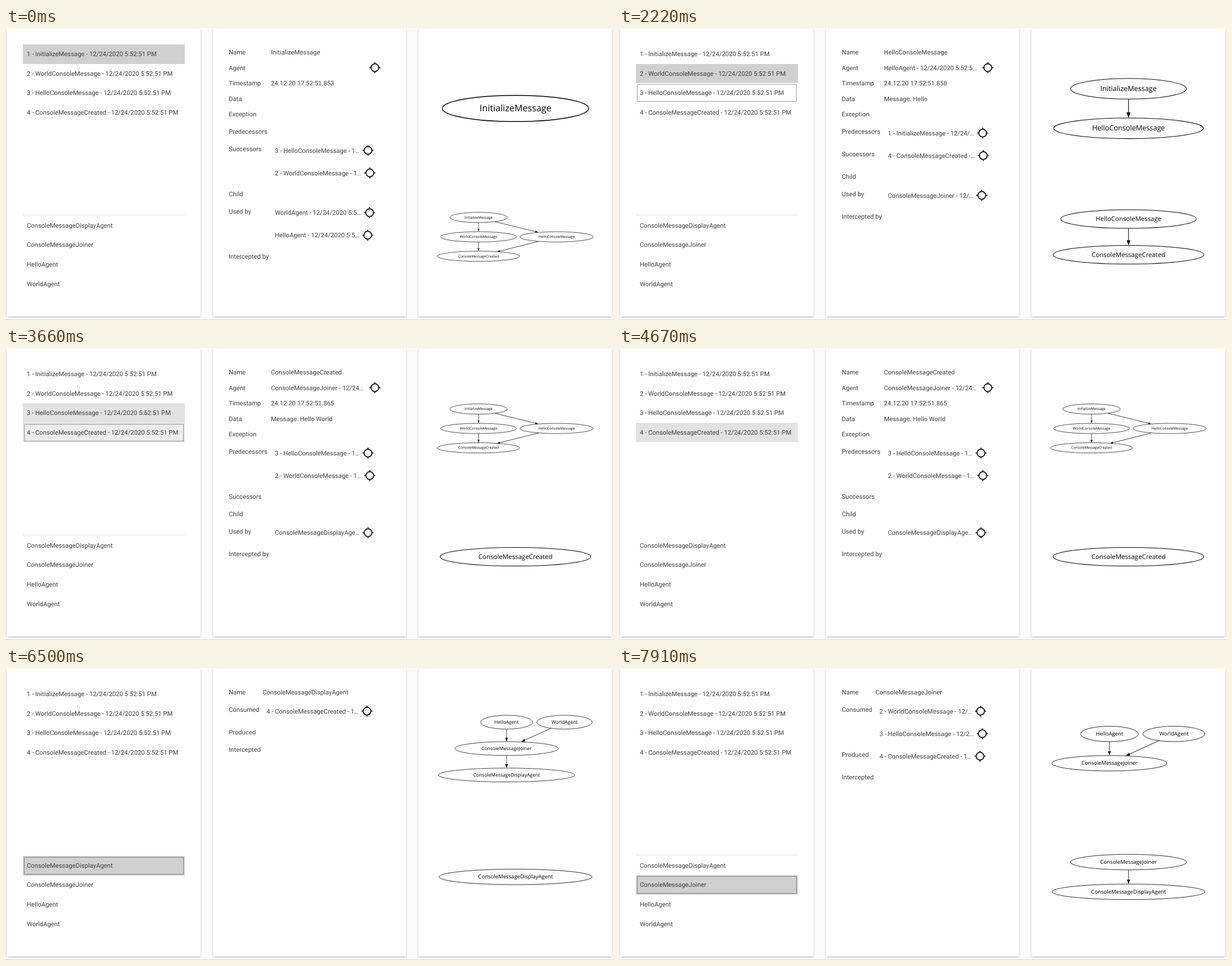
Animation, 1079 px wide and 519 px high, one loop 8000 ms. Source, as an HTML page with a canvas:

```html
<!DOCTYPE html>
<html lang="en">
<head>
<meta charset="utf-8">
<title>Message inspector</title>
<style>
  html, body { margin: 0; width: 100%; height: 100%; overflow: hidden; background: #fafafa; }
  canvas { display: block; }
</style>
</head>
<body>
<canvas id="stage" width="1079" height="519"></canvas>
<script>
const ctx = document.getElementById('stage').getContext('2d');
const LOOP = 8000;
const UI_FONT = '11.28px Roboto, sans-serif';
const MID = 905.7;
const STAMP = ' - 12/24/2020 5:52:51 PM';

// Each item: label, top of its row, and [time, grey] steps of its background.
const items = [
  { text: '1 - InitializeMessage' + STAMP, y: 29,
    fill: [[0, 208], [1220, 226], [1420, 250], [1620, 255]] },
  { text: '2 - WorldConsoleMessage' + STAMP, y: 64,
    fill: [[1220, 236], [1420, 218], [1620, 208], [2440, 230], [2640, 246], [2840, 255]] },
  { text: '3 - HelloConsoleMessage' + STAMP, y: 98,
    fill: [[2440, 232], [2640, 218], [2840, 208], [3660, 226], [3860, 243], [4060, 255]] },
  { text: '4 - ConsoleMessageCreated' + STAMP, y: 133,
    fill: [[3660, 236], [3860, 220], [4060, 208], [4670, 226], [4870, 236],
           [5070, 243], [5270, 246], [6100, 252], [6280, 255]] },
  { text: 'ConsoleMessageDisplayAgent', y: 334,
    fill: [[5880, 242], [6100, 230], [6280, 218], [6500, 208],
           [7310, 220], [7510, 232], [7710, 245], [7910, 255]] },
  { text: 'ConsoleMessageJoiner', y: 368,
    fill: [[7310, 242], [7510, 230], [7710, 212], [7910, 208]] },
  { text: 'HelloAgent', y: 403, fill: [] },
  { text: 'WorldAgent', y: 438, fill: [] }
];
const focus = [[0, -1], [1220, 1], [2220, 2], [3660, 3], [4670, -1], [5270, 4], [7310, 5]];

const node = (text, x, y, rx) => ({ text, x, y, rx });
const chain = (ry, a, b) => ({ ry, nodes: [a, b], down: [[0, 1]] });
const single = (ry, a) => ({ ry, nodes: [a] });

// The diamond of all four messages, placed by the y of its first row.
const fullGraph = y => ({
  ry: 9.1,
  nodes: [
    node('InitializeMessage', 840, y, 51),
    node('WorldConsoleMessage', 840, y + 34.5, 67.5),
    node('HelloConsoleMessage', 978.8, y + 34.5, 65.2),
    node('ConsoleMessageCreated', 840, y + 69, 73)
  ],
  down: [[0, 1], [1, 3]],
  slant: [[869, y + 7.5, 946, y + 26.4], [946.5, y + 42.6, 873, y + 61]]
});

const message = (name, agent, stamp, data, before, after, users, graphs) => ({
  valueX: 471, rowX: 478, graphs,
  fields: [['Name', name], ['Agent', agent], ['Timestamp', '24.12.20 17:52:51.' + stamp],
           ['Data', data], ['Exception', '']],
  listY: 184,
  lists: [['Predecessors', before], ['Successors', after], ['Child', []],
          ['Used by', users], ['Intercepted by', []]]
});
const agent = (name, consumed, produced, graphs) => ({
  valueX: 456, rowX: 463, graphs,
  fields: [['Name', name]],
  listY: 74,
  lists: [['Consumed', consumed], ['Produced', produced], ['Intercepted', []]]
});

const first = ['1 - InitializeMessage - 12/24/…'];
const last = ['4 - ConsoleMessageCreated -…'];
const pair = ['3 - HelloConsoleMessage - 1…', '2 - WorldConsoleMessage - 1…'];
const joiner = ['ConsoleMessageJoiner - 12/…'];
const created = y => node('ConsoleMessageCreated', MID, y, 134);
const display = y => node('ConsoleMessageDisplayAgent', MID, y, 136);

const views = [
  [0, message('InitializeMessage', '', '853', '', [], pair,
    ['WorldAgent - 12/24/2020 5:5…', 'HelloAgent - 12/24/2020 5:5…'],
    [single(23.3, node('InitializeMessage', MID, 143, 130)), fullGraph(336.7)])],
  [1220, message('WorldConsoleMessage', 'WorldAgent - 12/24/2020 5:52:…', '858',
    'Message: World', first, last, joiner,
    [chain(17.7, node('InitializeMessage', MID, 109.5, 100),
                 node('WorldConsoleMessage', MID, 177, 133.5)),
     chain(16.5, node('WorldConsoleMessage', MID, 339.5, 124.5), created(403))])],
  [2220, message('HelloConsoleMessage', 'HelloAgent - 12/24/2020 5:52:5…', '858',
    'Message: Hello', first, last, joiner,
    [chain(18.3, node('InitializeMessage', MID, 108, 103),
                 node('HelloConsoleMessage', MID, 178.3, 133)),
     chain(16.5, node('HelloConsoleMessage', MID, 339.5, 120.5), created(403))])],
  [3660, message('ConsoleMessageCreated', 'ConsoleMessageJoiner - 12/24…', '865',
    'Message: Hello World', pair, [], ['ConsoleMessageDisplayAge…'],
    [fullGraph(108.5), single(16.6, created(371))])],
  [5880, agent('ConsoleMessageDisplayAgent', ['4 - ConsoleMessageCreated - 1…'], [],
    [{ ry: 12.3,
       nodes: [node('HelloAgent', 889.8, 96.3, 46.3), node('WorldAgent', 992.8, 96.3, 49.3),
               node('ConsoleMessageJoiner', 889.8, 143.2, 92),
               node('ConsoleMessageDisplayAgent', 889.8, 190.2, 121)],
       down: [[0, 2], [2, 3]], slant: [[969, 107, 916, 131]] },
     single(13.8, display(371.3))])],
  [7310, agent('ConsoleMessageJoiner',
    ['2 - WorldConsoleMessage - 12/…', '3 - HelloConsoleMessage - 12/2…'],
    ['4 - ConsoleMessageCreated - 1…'],
    [{ ry: 13.7,
       nodes: [node('HelloAgent', 871.8, 117.2, 51.3), node('WorldAgent', 986.5, 117.2, 55),
               node('ConsoleMessageJoiner', 871.8, 169.3, 102.3)],
       down: [[0, 2]], slant: [[960, 129, 901, 156]] },
     chain(13.8, node('ConsoleMessageJoiner', MID, 345, 103.2), display(397.8))])]
];

// Latest value of a [time, value] list at time t.
function at(steps, t, value) {
  for (const [start, v] of steps) if (t >= start) value = v;
  return value;
}

function card(x, w) {
  ctx.save();
  ctx.fillStyle = '#fff';
  for (const [blur, dy, alpha] of [[3.6, 0.7, 0.16], [1.4, 1.4, 0.14], [0.7, 0.7, 0.2]]) {
    ctx.shadowColor = `rgba(0,0,0,${alpha})`;
    ctx.shadowBlur = blur;
    ctx.shadowOffsetY = dy;
    ctx.fillRect(x, 1, w, 512);
  }
  ctx.restore();
}

function label(text, x, y) {
  ctx.font = UI_FONT;
  ctx.textAlign = 'left';
  ctx.fillStyle = '#404040';
  ctx.fillText(text, x, y);
}

function target(x, y) {
  ctx.strokeStyle = '#111';
  ctx.lineWidth = 1.8;
  ctx.beginPath();
  ctx.arc(x, y, 6.9, 0, 2 * Math.PI);
  for (const [dx, dy] of [[1, 0], [0, 1], [-1, 0], [0, -1]]) {
    ctx.moveTo(x + dx * 7, y + dy * 7);
    ctx.lineTo(x + dx * 9.8, y + dy * 9.8);
  }
  ctx.stroke();
}

function drawItems(t) {
  if (t < 4670 || t >= 7310) {
    ctx.fillStyle = '#e0e0e0';
    ctx.fillRect(30, 332, 288, 1);
  }
  const focused = at(focus, t);
  items.forEach(({ text, y, fill }, i) => {
    const grey = at(fill, t, 255);
    if (grey < 255) {
      ctx.fillStyle = `rgb(${grey},${grey},${grey})`;
      ctx.fillRect(30, y, 288, i === 1 || i === 3 ? 34 : 35);
    }
    if (i === focused) {
      ctx.strokeStyle = '#333';
      ctx.lineWidth = 1;
      ctx.setLineDash([1, 1]);
      ctx.lineDashOffset = 0.5; // keeps the dots on whole pixels
      ctx.strokeRect(32.5, y + 2.5, 283, 30);
      ctx.setLineDash([]);
    }
    label(text, 37, y + 21);
  });
}

function drawDetails({ fields, lists, listY, valueX, rowX }) {
  fields.forEach(([name, value], i) => {
    const y = 43 + i * 27.5;
    label(name, 396, Math.round(y + 4));
    label(value, valueX, Math.round(y + 4));
    if (name === 'Agent') target(655.7, y);
  });
  let y = listY;
  for (const [name, rows] of lists) {
    label(name, 396, Math.round(y + 4));
    rows.forEach((text, i) => {
      const rowY = y + 2.7 + i * 40;
      label(text, rowX, Math.round(rowY + 4));
      target(rowX + ctx.measureText(text).width + 15.2, rowY);
    });
    y += rows.length ? rows.length * 40 : 30.8;
  }
}

function arrow(x1, y1, x2, y2, scale) {
  const len = Math.hypot(x2 - x1, y2 - y1);
  const head = 10 * scale, half = 3.5 * scale;
  ctx.save();
  ctx.translate(x2, y2);
  ctx.rotate(Math.atan2(y2 - y1, x2 - x1));
  ctx.beginPath();
  ctx.moveTo(-len, 0);
  ctx.lineTo(-head, 0);
  ctx.stroke();
  ctx.beginPath();
  ctx.moveTo(0, 0);
  ctx.lineTo(-head, half);
  ctx.lineTo(-head, -half);
  ctx.fill();
  ctx.restore();
}

function drawGraph({ ry, nodes, down = [], slant = [] }) {
  const scale = ry / 18;
  const size = ry * 0.692;
  ctx.strokeStyle = ctx.fillStyle = '#000';
  ctx.lineWidth = Math.max(0.7, scale * 1.1);
  ctx.font = `${size}px "Open Sans", sans-serif`;
  ctx.textAlign = 'center';
  for (const { text, x, y, rx } of nodes) {
    ctx.beginPath();
    ctx.ellipse(x, y, rx, ry, 0, 0, 2 * Math.PI);
    ctx.stroke();
    ctx.fillText(text, x, y + size * 0.31);
  }
  for (const [a, b] of down) {
    const { x, y } = nodes[a];
    arrow(x, y + ry, x, nodes[b].y - ry, scale);
  }
  for (const line of slant) arrow(...line, scale);
}

function draw(now) {
  const t = now % LOOP;
  ctx.textRendering = 'geometricPrecision';
  ctx.fillStyle = '#fafafa';
  ctx.fillRect(0, 0, 1079, 519);
  card(2, 344);
  card(368, 343);
  card(733, 344);
  ctx.fillStyle = '#d4d4d4';
  ctx.fillRect(0, 518, 1079, 1);

  const view = at(views, t);
  drawItems(t);
  drawDetails(view);
  view.graphs.forEach(drawGraph);
}

const start = performance.now();
function tick() {
  draw(performance.now() - start);
  requestAnimationFrame(tick);
}
tick();
</script>
</body>
</html>
```
